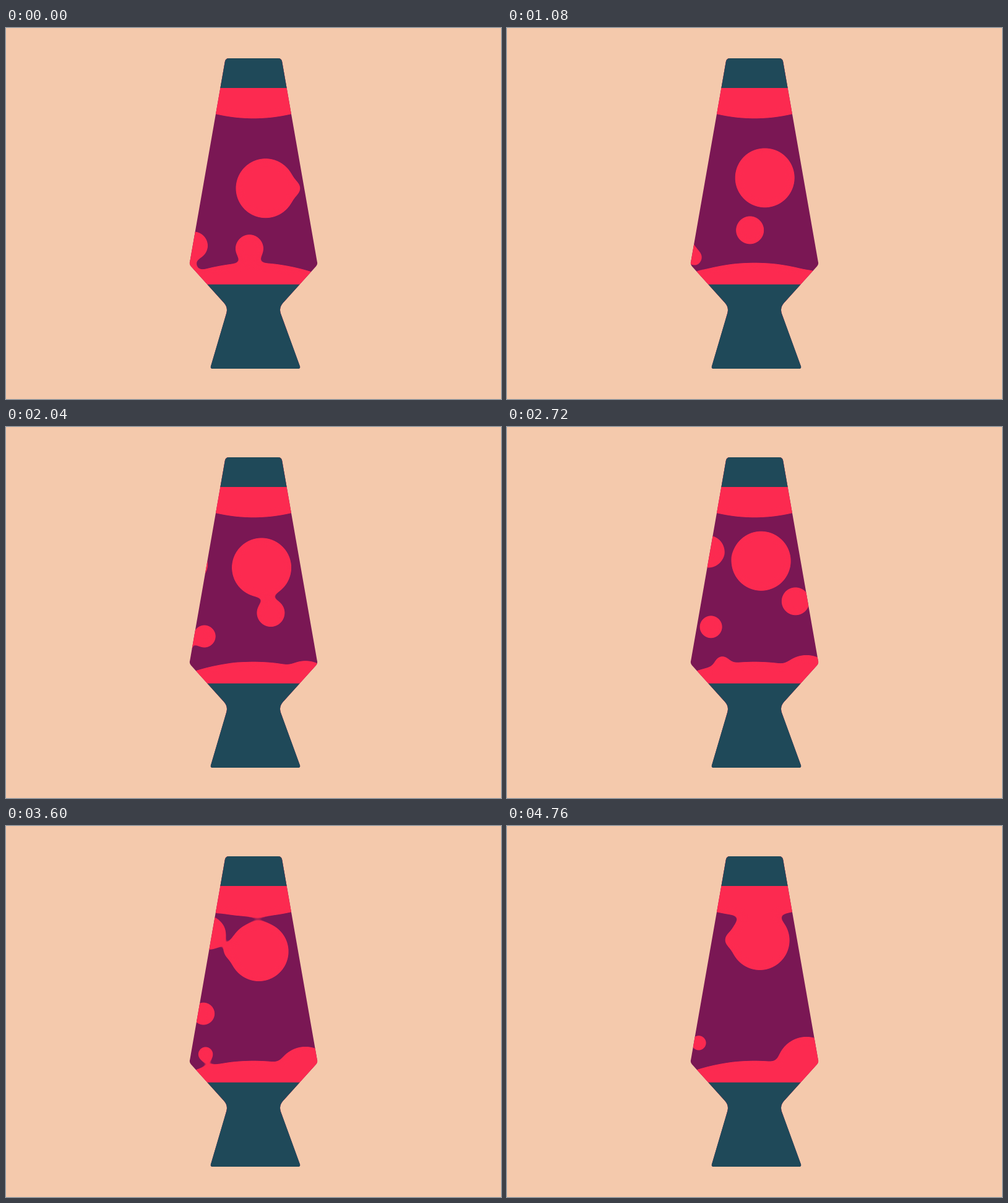
An HTML page that plays this animation: 800 by 600 pixels, repeating every 4.8 s.

```html
<!DOCTYPE html>
<html lang="en">
<head>
<meta charset="utf-8">
<title>Lava lamp</title>
<style>
  html, body { margin: 0; width: 100%; height: 100%; overflow: hidden; background: #f4c9ac; }
  svg { display: block; width: 100vw; height: 100vh; }
  .glass { fill: #7a1754; }
  .lava { fill: #fc2a50; }
  .metal { fill: #1f4959; }
</style>
</head>
<body>
<svg viewBox="0 0 800 600">
  <defs>
    <clipPath id="lamp">
      <path d="M360 49H440Q445.2 49 446.2 54.5L502.8 378Q504.1 382 501 385.6L447.8 444.5
               Q441.2 451.7 443.7 461L475 547Q476 551 472.5 551H333.5Q330 551 331 547
               L356.3 461Q358.8 451.7 352.2 444.5L299 385.6Q295.9 382 297.2 378L353.8 54.5Q354.8 49 360 49Z"/>
    </clipPath>
    <filter id="goo" filterUnits="userSpaceOnUse" x="100" y="0" width="600" height="600"
            color-interpolation-filters="sRGB">
      <feGaussianBlur stdDeviation="6.5"/>
      <feColorMatrix values="1 0 0 0 0  0 1 0 0 0  0 0 1 0 0  0 0 0 19 -9"/>
    </filter>
  </defs>
  <g clip-path="url(#lamp)">
    <rect class="glass" x="280" y="40" width="240" height="520"/>
    <g class="lava" filter="url(#goo)">
      <path d="M300 40H500V127.6Q400 165.2 300 127.6Z"/>
      <path d="M260 470V412.5Q400 346.7 540 412.5V470Z"/>
      <!-- each blob stands where it starts; data-peak is the time it is furthest right -->
      <circle r="48.4" cx="419.5" cy="259.2" data-peak="-620" data-sway="5.9" data-rise="15.6"/>
      <circle r="48.4" cx="484" cy="454.2" data-peak="0" data-sway="0" data-rise="13.7"/>
      <circle r="26.8" cx="168" cy="287.2" data-peak="3250"/>
      <circle r="23.4" cx="393.5" cy="356.7" data-peak="-4240"/>
      <circle r="23.4" cx="303.5" cy="352" data-peak="0"/>
      <circle r="19.1" cx="234" cy="384.4" data-peak="2790"/>
      <circle r="13.4" cx="463.5" cy="259.2" data-peak="-620"/>
      <circle r="13.4" cx="295.4" cy="388" data-peak="850"/>
      <circle r="13.4" cx="416.8" cy="425.8" data-peak="-120"/>
    </g>
    <rect class="metal" x="280" y="40" width="240" height="57"/>
    <rect class="metal" x="280" y="414.7" width="240" height="146"/>
  </g>
</svg>
<script>
  const LOOP = 4800;
  const wave = ms => Math.cos(Math.PI * ms / LOOP);

  // Sway (px) and rise (px/s) grow with the radius unless a blob sets its own.
  const blobs = [...document.querySelectorAll("circle")].map(el => {
    const r = el.r.baseVal.value;
    const { peak, sway = 4 * r, rise = 1.175 * r } = el.dataset;
    return { el, x: el.cx.baseVal.value, y: el.cy.baseVal.value, peak: +peak, sway: +sway, rise: +rise };
  });

  const start = performance.now();

  function draw() {
    const t = (performance.now() - start) % LOOP;
    for (const { el, x, y, peak, sway, rise } of blobs) {
      el.setAttribute("cx", x + sway * (wave(t - peak) - wave(peak)));
      el.setAttribute("cy", y - rise * t / 1000);
    }
    requestAnimationFrame(draw);
  }
  draw();
</script>
</body>
</html>
```
